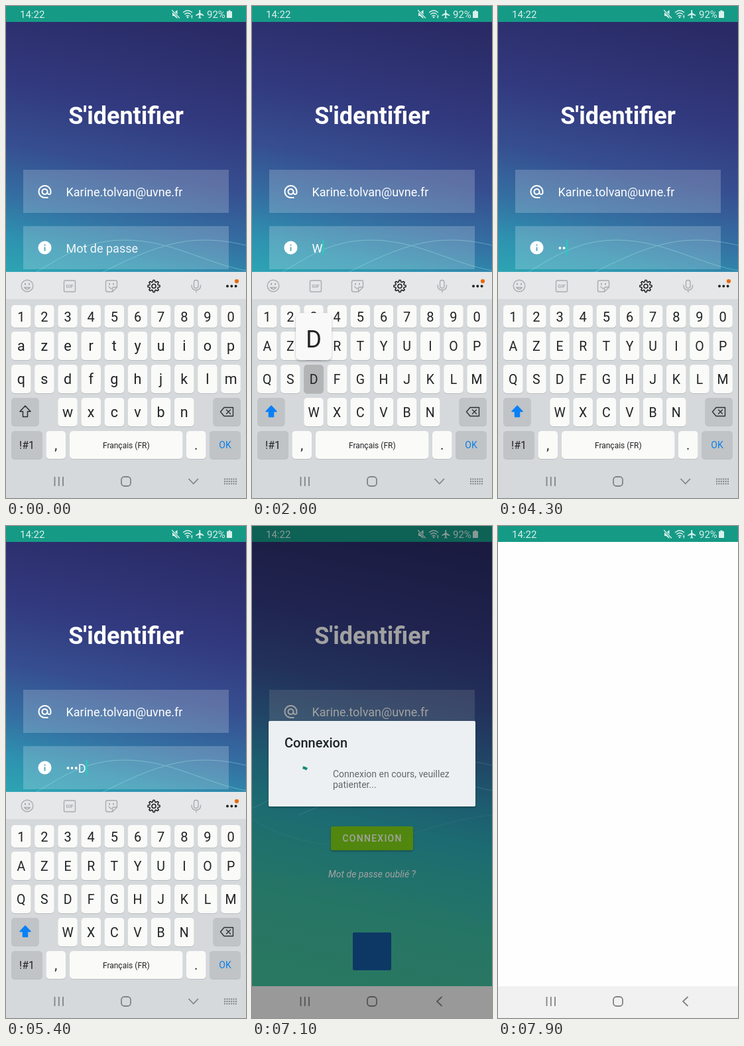
An HTML page that plays this animation: 362x742 px, repeating every 8 s.

```html
<!DOCTYPE html>
<html lang="fr">
<head>
<meta charset="utf-8">
<title>S'identifier</title>
<style>
html, body { margin: 0; width: 100%; height: 100%; overflow: hidden; background: #fff; }
svg { display: block; width: 362px; height: 742px; font-family: Roboto, sans-serif; }
.mid { text-anchor: middle; }
.line { fill: none; stroke-linecap: round; stroke-linejoin: round; }
</style>
</head>
<body>
<svg viewBox="0 0 362 742" xmlns="http://www.w3.org/2000/svg">
  <defs>
    <linearGradient id="sky" gradientUnits="userSpaceOnUse" x1="253" y1="24" x2="113" y2="694">
      <stop offset="0" stop-color="#2a2b66"/>
      <stop offset=".2" stop-color="#32397e"/>
      <stop offset=".34" stop-color="#364f90"/>
      <stop offset=".45" stop-color="#346fa2"/>
      <stop offset=".54" stop-color="#2e92b0"/>
      <stop offset=".63" stop-color="#2da8b4"/>
      <stop offset=".73" stop-color="#33b3aa"/>
      <stop offset=".86" stop-color="#3cb9a0"/>
      <stop offset="1" stop-color="#3fbc9b"/>
    </linearGradient>
    <clipPath id="screen"><rect y="24" width="362" height="670"/></clipPath>
    <filter id="soft" x="-20%" y="-20%" width="140%" height="150%">
      <feDropShadow dx="0" dy="1.5" stdDeviation="1.5" flood-opacity=".3"/>
    </filter>
  </defs>

  <g clip-path="url(#screen)">
    <g id="login">
      <rect y="24" width="362" height="690" fill="url(#sky)"/>
      <path d="M0 520Q180 535 362 600V714H0Z" fill="#4cc08f" opacity=".12"/>
      <g class="line" stroke="#8fe6e6" opacity=".42">
        <path d="M0 426C60 400 100 353 178 353C250 353 300 388 362 399"/>
        <path d="M70 436C150 405 220 352 300 353C325 353 345 357 362 361"/>
        <path d="M0 442C60 480 150 494 210 474S320 440 362 436" opacity=".45"/>
      </g>
      <text class="mid" x="181" y="178" font-size="36" font-weight="700" fill="#fff">S'identifier</text>
      <g fill="#fff">
        <rect x="26" y="247" width="310" height="65" opacity=".2"/>
        <rect x="26" y="332" width="310" height="65" opacity=".2"/>
        <path transform="translate(46.5 268)" d="M12 2C6.48 2 2 6.48 2 12s4.48 10 10 10h5v-2h-5c-4.34 0-8-3.66-8-8s3.66-8 8-8 8 3.66 8 8v1.43c0 .79-.71 1.57-1.5 1.57s-1.5-.78-1.5-1.57V12c0-2.76-2.24-5-5-5s-5 2.24-5 5 2.24 5 5 5c1.38 0 2.64-.56 3.54-1.47.65.89 1.77 1.47 2.96 1.47 1.97 0 3.5-1.6 3.5-3.57V12c0-5.52-4.48-10-10-10zm0 13c-1.66 0-3-1.34-3-3s1.34-3 3-3 3 1.34 3 3-1.34 3-3 3z"/>
        <path transform="translate(46.5 352.5)" d="M12 2C6.48 2 2 6.48 2 12s4.48 10 10 10 10-4.48 10-10S17.52 2 12 2zm1 15h-2v-6h2v6zm0-8h-2V7h2v2z"/>
        <text x="90.5" y="287" font-size="18">Karine.tolvan@uvne.fr</text>
        <text id="pass" x="90.5" y="371.5" font-size="18"></text>
      </g>
      <rect id="caret" y="352.5" width="2" height="23" fill="#1fd0b8"/>
      <rect x="119" y="453" width="124" height="36" rx="3" fill="#80d619" filter="url(#soft)"/>
      <text class="mid" x="181.6" y="476" font-size="14" font-weight="500" letter-spacing="1.25" fill="#fff">CONNEXION</text>
      <text class="mid" x="181" y="530" font-size="14" font-style="italic" fill="#fff">Mot de passe oublié ?</text>
      <rect x="152" y="613" width="58" height="57" rx="2" fill="#14599f"/>
    </g>
    <rect id="blank" width="362" height="670" fill="#fefefe"/>
    <g id="board">
      <rect y="401" width="362" height="293" fill="#d5d9db"/>
      <rect y="401" width="362" height="41" fill="#e5e7e8"/>
      <g class="line" stroke="#a9adaf" stroke-width="1.4">
        <circle cx="32" cy="422" r="8.8"/>
        <path d="M27.5 424.5Q32 430 36.500 424.500Z"/>
        <path d="M29 418.800v1M35 418.800v1" stroke-width="2.200"/>
        <rect x="87.500" y="414" width="17" height="17" rx="2"/>
        <path d="M153 414h12.500q2 0 2 2v8l-7 7h-7.500q-2.500 0-2.500-2.500v-12q0-2.500 2.500-2.500ZM167.500 424h-5q-2 0-2 2v5M155 423q1.500 3 4 3"/>
        <path d="M156 418.800v1M162 418.800v1" stroke-width="2"/>
        <rect x="283.500" y="413.500" width="6.500" height="12" rx="3.250"/>
        <path d="M280 421q0 7.500 6.800 7.500t6.800-7.500M286.800 428.500v3"/>
      </g>
      <text class="mid" x="96" y="425.200" font-size="7.500" font-weight="700" fill="#a9adaf">GIF</text>
      <path id="gear" class="line" stroke="#202224" stroke-width="1.600"/>
      <circle class="line" cx="223" cy="422.500" r="3" stroke="#202224" stroke-width="1.600"/>
      <path class="line" d="M334 422.500h.01M340.300 422.500h.01M346.600 422.500h.01" stroke="#202224" stroke-width="4"/>
      <circle cx="348" cy="415" r="3.100" fill="#e8690b"/>
      <g id="keys"></g>
      <path id="shift" class="line" d="M29 603l8 8.500h-4.500v8h-7v-8H21Z" stroke-width="1.500"/>
      <path class="line" d="M323.500 612l5.500-6.500h13.500v13H329ZM332.500 609l6 6M338.500 609l-6 6" stroke="#2c2f31" stroke-width="1.400"/>
      <g id="popup" filter="url(#soft)">
        <rect x="-27" width="54" height="71" rx="7" fill="#f9f9f9"/>
        <text id="big" class="mid" y="51.500" font-size="36" fill="#202224"></text>
      </g>
    </g>
  </g>

  <rect id="nav" y="694" width="362" height="48"/>
  <g class="line" stroke="#828486" stroke-width="1.800" style="stroke-linecap:butt">
    <path d="M73.500 710v14M79.800 710v14M86 710v14"/>
    <rect x="174" y="710" width="14" height="14" rx="4.500"/>
    <path id="back" d="M286.500 710l-7.500 7 7.500 7"/>
    <path id="down" d="M275.500 713l7.200 7.500 7.200-7.500"/>
    <path id="dots" d="M329 713.500h19M329 717h19M329 720.500h19" stroke-dasharray="2 1.400"/>
  </g>

  <g fill="#d9f1ec">
    <rect width="362" height="24" fill="#159a86"/>
    <text x="21" y="18" font-size="15">14:22</text>
    <text x="303" y="18" font-size="15">92%</text>
    <path d="M333 8h2.500v-1.500h3V8H341v10h-8Z"/>
    <path d="M251 10h2.500l5-4v13l-5-4H251Z"/>
    <path class="line" d="M250.500 6.500l11 11.500" stroke="#159a86" stroke-width="3"/>
    <path class="line" d="M250.500 6.500l11 11.500" stroke="#d9f1ec" stroke-width="1.300"/>
    <path class="line" d="M267.500 9.500q6.500-5.500 13 0M269.700 12.300q4.300-3.600 8.600 0M271.800 15q2.200-1.800 4.400 0" stroke="#d9f1ec" stroke-width="1.400"/>
    <circle cx="274" cy="17" r="1.300"/>
    <path d="M279 16l1.300-3 1.300 3ZM279 16.500h2.600l-1.300 2.500Z"/>
    <path transform="translate(285 4.800) scale(.63)" d="M21 16v-2l-8-5V3.500c0-.83-.67-1.500-1.500-1.500S10 2.670 10 3.500V9l-8 5v2l8-2.500V19l-2 1.500V22l3.500-1 3.500 1v-1.500L13 19v-5.500l8 2.500z"/>
  </g>

  <rect id="dim" width="362" height="742"/>
  <g id="dialog">
    <rect x="25" y="294" width="312" height="129" rx="2" fill="#ecf0f2" filter="url(#soft)"/>
    <text x="49" y="333.500" font-size="20" font-weight="500" fill="#1d2426">Connexion</text>
    <g font-size="14" fill="#63686b">
      <text x="122" y="379">Connexion en cours, veuillez</text>
      <text x="122" y="395">patienter...</text>
    </g>
    <path id="ring" class="line" stroke="#12897a" stroke-width="4" style="stroke-linecap:butt"/>
  </g>
</svg>
<script>
const $ = id => document.getElementById(id);
const set = (el, attrs) => { for (const k in attrs) el.setAttribute(k, attrs[k]); return el; };
const show = (el, on) => { el.style.display = on ? '' : 'none'; };
const clamp = v => Math.max(0, Math.min(1, v));
const ease = v => { v = clamp(v); return v * v * (3 - 2 * v); };
const LOOP = 8000, STEP = 100, CAPS = 800, PITCH = 35.15;
const keys = {};

function add(tag, attrs, text) {
  const el = document.createElementNS('http://www.w3.org/2000/svg', tag);
  if (text) el.textContent = text;
  return $('keys').appendChild(set(el, attrs));
}

function addKey(label, x, y, w, h, opt = {}) {
  const fill = opt.fill || '#fafaf8';
  add('rect', { x, y: y + 1, width: w, height: h, rx: 5, fill: '#b9bec1' });
  const rect = add('rect', { x, y, width: w, height: h, rx: 5, fill });
  const text = add('text', {
    class: 'mid', x: x + w / 2, y: opt.base || y + h / 2 + 7.5,
    'font-size': opt.size || 20, fill: opt.ink || '#202224'
  }, label);
  return { label, rect, text, fill, x: x + w / 2, y };
}

function buildKeys() {
  const grey = '#c0c4c6';
  [...'1234567890'].forEach((c, i) => addKey(c, 8 + i * PITCH, 451, 29.5, 34));
  [['azertyuiop', 0, 491], ['qsdfghjklm', 0, 541], ['wxcvbn', 2, 591]].forEach(([row, from, y]) =>
    [...row].forEach((c, i) => { keys[c] = addKey(c, 8 + (from + i) * PITCH, y, 29.5, 43); }));
  addKey('', 8, 591, 41.5, 42, { fill: grey });
  addKey('', 312.5, 591, 41.5, 42, { fill: grey });
  addKey('!#1', 8, 641, 47, 42, { fill: grey, size: 16, base: 668 });
  addKey(',', 60.5, 641, 29.5, 42, { base: 669 });
  addKey('Français (FR)', 96, 641, 170.5, 42, { size: 12, base: 666.5 });
  addKey('.', 272, 641, 29.5, 42, { base: 669 });
  addKey('OK', 307, 641, 47, 42, { fill: grey, size: 14, base: 667, ink: '#0b7fe8' });
}

function buildGear() {
  let d = '';
  for (let i = 0; i < 96; i++) {
    const a = i / 96 * 2 * Math.PI;
    const r = 7.8 + 1.3 * Math.tanh(2.5 * Math.cos(8 * a));
    d += (i ? 'L' : 'M') + (223 + r * Math.cos(a)).toFixed(2) + ' ' + (422.5 + r * Math.sin(a)).toFixed(2);
  }
  $('gear').setAttribute('d', d + 'Z');
}

// [key, pressed at, released at]
const presses = [['w', 1500, 1700], ['d', 2000, 2200], ['f', 4700, 4800], ['d', 5200, 5300]];
const MASK = 1500;

function drawField(t) {
  const done = presses.filter(p => t >= p[2]);
  const last = done[done.length - 1];
  const pass = $('pass');
  let typed = '•'.repeat(done.length);
  if (last && (t < last[2] + MASK || last === presses[3])) typed = typed.slice(1) + last[0].toUpperCase();
  pass.textContent = typed || 'Mot de passe';
  pass.setAttribute('opacity', typed ? 1 : .92);
  const since = t - (last ? last[2] : 200);
  show($('caret'), since >= 0 && since % 1000 < 500);
  $('caret').setAttribute('x', 90.5 + (typed ? pass.getComputedTextLength() : 0));
}

function drawBoard(t) {
  const open = t < 6000, caps = t >= CAPS;
  const slide = 300 * Math.pow(clamp((t - 5600) / 400), 1.5);
  show($('board'), open);
  $('board').setAttribute('transform', `translate(0 ${slide})`);
  $('nav').setAttribute('fill', open ? '#d5d9db' : '#f1f1f1');
  show($('down'), open);
  show($('dots'), open);
  show($('back'), !open);

  const press = presses.find(p => t >= p[1] && t < p[2]);
  const hit = press && keys[press[0]];
  for (const c in keys) {
    const k = keys[c];
    k.text.textContent = caps ? c.toUpperCase() : c;
    set(k.text, { 'font-size': caps ? 19.5 : 21.5 });
    k.rect.setAttribute('fill', k === hit ? '#b2b4b5' : k.fill);
  }
  set($('shift'), { stroke: caps ? '#0b80f5' : '#2c2f31' }).style.fill = caps ? '#0b80f5' : 'none';
  show($('popup'), hit);
  if (hit) {
    $('big').textContent = press[0].toUpperCase();
    $('popup').setAttribute('transform', `translate(${hit.x} ${hit.y - 78})`);
  }
}

function drawDialog(t) {
  const alpha = clamp((t - 6700) / 300) * clamp((7800 - t) / 200);
  show($('dialog'), alpha > 0);
  show($('dim'), alpha > 0);
  $('dialog').setAttribute('opacity', alpha);
  $('dim').setAttribute('opacity', alpha * .37);
  const time = t - 7100 + 1333, turn = time % 1333 / 1333;
  const base = 10 + (t - 7100) * .16;
  const from = base + 270 * ease(turn * 2 - 1), to = base + 22 + 270 * ease(turn * 2);
  const at = deg => {
    const a = (deg - 90) * Math.PI / 180;
    return `${73.5 + 18 * Math.cos(a)} ${382 + 18 * Math.sin(a)}`;
  };
  $('ring').setAttribute('d', `M${at(from)}A18 18 0 ${to - from > 180 ? 1 : 0} 1 ${at(to)}`);
}

function drawExit(t) {
  const p = ease((t - 7600) / 300);
  $('login').setAttribute('transform', `translate(0 ${-15 * p})`);
  $('blank').setAttribute('y', 694 - 670 * p);
  show($('blank'), p > 0);
}

function render(ms) {
  const t = Math.floor(ms % LOOP / STEP) * STEP;
  drawField(t);
  drawBoard(t);
  drawDialog(t);
  drawExit(t);
}

buildKeys();
buildGear();
const start = performance.now();
function tick() {
  render(performance.now() - start);
  requestAnimationFrame(tick);
}
tick();
</script>
</body>
</html>
```
